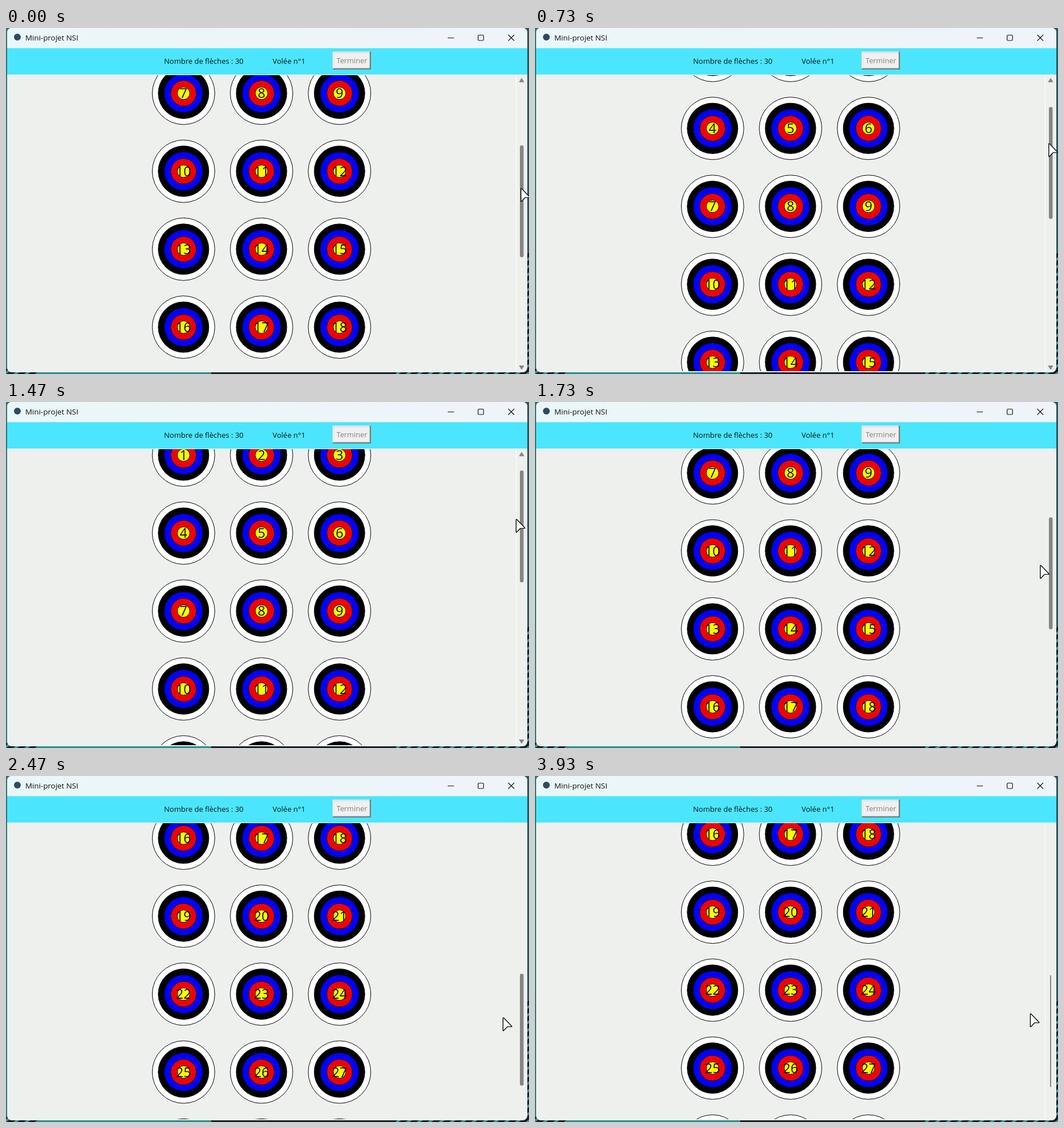
Recreate the animation shown at these times as an HTML page. Size 920 px wide and 609 px high, loop 4 s.

```html
<!DOCTYPE html>
<html lang="fr">
<head>
<meta charset="utf-8">
<title>Mini-projet NSI</title>
<style>
  html, body { margin: 0; width: 100%; height: 100%; overflow: hidden; background: #17242b; }
  svg { display: block; width: 920px; height: 609px; }
  text { font-family: "Open Sans", "Noto Sans", sans-serif; font-size: 13px; fill: #101314; }
  .num { font-size: 23.5px; text-anchor: middle; fill: #101010; }
  .rings circle { stroke: #000; stroke-width: 1; }
  .icons { fill: none; stroke: #111; stroke-width: 1.2; }
</style>
</head>
<body>
<svg viewBox="0 0 920 609">
  <defs>
    <pattern id="stripes" width="11" height="11" patternUnits="userSpaceOnUse" patternTransform="rotate(-35)">
      <rect width="11" height="11" fill="#17202a"/>
      <rect width="11" height="4" fill="#2d9a98"/>
    </pattern>
    <linearGradient id="bar">
      <stop offset="0" stop-color="#eaf7f8"/>
      <stop offset="1" stop-color="#eff4fa"/>
    </linearGradient>
    <clipPath id="win"><rect x="2" y="0" width="915" height="606" rx="8"/></clipPath>
    <clipPath id="view"><rect x="2" y="83" width="894" height="521"/></clipPath>
    <g id="target" class="rings">
      <circle r="55" fill="#fff"/>
      <circle r="44.5" fill="#000"/>
      <circle r="34" fill="#00f"/>
      <circle r="22.5" fill="#f00000"/>
      <circle r="11" fill="#ff0"/>
    </g>
  </defs>

  <rect width="920" height="609" fill="url(#stripes)"/>
  <rect width="10" height="600" fill="#2a7676"/>
  <rect x="910" width="10" height="395" fill="#275a60"/>
  <rect x="55" y="605" width="306" height="4" fill="#2a8f8c"/>
  <rect x="361" y="605" width="325" height="4" fill="#17242b"/>

  <g clip-path="url(#win)">
    <rect width="920" height="609" fill="#eef0ee"/>
    <rect width="920" height="36" fill="url(#bar)"/>
    <rect y="35.5" width="920" height="46.5" fill="#4be6fd"/>
    <rect y="82" width="920" height="1" fill="#f9fbfa"/>
    <rect id="edge" x="897" y="82" width="1" height="524" fill="#fff"/>
  </g>

  <circle cx="20" cy="16" r="6" fill="#2f4b63"/>
  <text x="34" y="22" style="font-size:13.4px">Mini-projet NSI</text>
  <g class="icons">
    <path d="M777 17.5h11M883.5 12l10.5 10.5M894 12l-10.5 10.5"/>
    <rect x="830.5" y="12.5" width="9.5" height="9.5" rx="1.5"/>
  </g>

  <g font-weight="500">
    <text x="278" y="63">Nombre de flèches : 30</text>
    <text x="469" y="63">Volée n°1</text>
  </g>
  <rect x="574.5" y="41.5" width="67.5" height="31.5" fill="#6b6f70"/>
  <path d="M574.5 41.5h66.5l-2 2H577v27l-2.5 1.500z" fill="#fff"/>
  <rect x="576.5" y="43.5" width="64" height="28" fill="#a3a6a6"/>
  <rect x="576.5" y="43.5" width="63" height="27" fill="#f0f0f0"/>
  <text x="581.5" y="62" style="font-size:12.8px;fill:#808080">Terminer</text>

  <g clip-path="url(#view)"><g id="list"></g></g>

  <path id="arrows" d="M907 88.5l4 6.5h-8zM907 601l4-6.5h-8z" fill="#858585" stroke="#858585" stroke-linejoin="round"/>
  <rect id="thumb" height="197" fill="#858585"/>
  <g id="cursor">
    <path d="M2 3V22.5L8.5 16H17z" fill="#000" opacity=".15"/>
    <path d="M.8 1V21.5Q.8 23 1.9 21.9L7.8 15.6H14.6Q16 15.4 15 14.3L2 .8Q.8 -.2 .8 1z" fill="#fff" stroke="#111" stroke-width="1.4" stroke-linejoin="round"/>
  </g>
</svg>
<script>
const LOOP = 4000, STEP = LOOP / 60, ROW = 137.2;
const $ = id => document.getElementById(id);
const edge = $('edge'), list = $('list'), arrows = $('arrows'), thumb = $('thumb'), cursor = $('cursor');

// [step, thumb top]
const THUMB = [[0, 206.4], [11, 139], [16, 101], [21, 101], [22, 120.6], [26, 203],
  [31, 287.4], [33, 313], [35, 334], [37, 348], [40, 350.5]];
// [step, tip x, tip y]
const POINTER = [[0, 905, 282], [11, 903, 203], [16, 901, 174], [19, 899, 181], [21, 899, 181],
  [22, 896.5, 206], [26, 888, 287], [31, 877, 368], [33, 875, 394], [35, 874, 415],
  [37, 873.5, 425], [47, 870.5, 418]];

function at(keys, n, col) {
  const i = keys.findIndex(k => k[0] > n);
  if (i < 0) return keys[keys.length - 1][col];
  const a = keys[i - 1], b = keys[i];
  return a[col] + (b[col] - a[col]) * (n - a[0]) / (b[0] - a[0]);
}

let html = '';
for (let i = 0; i < 30; i++) {
  const x = 312.3 + (i % 3) * ROW, y = Math.floor(i / 3) * ROW;
  html += `<g transform="translate(${x} ${y})"><use href="#target"/><text class="num" y="8.5">${i + 1}</text></g>`;
}
list.innerHTML = html;

function draw(ms) {
  const n = Math.floor(((ms + 4) % LOOP) / STEP);
  const top = at(THUMB, n, 1);
  const inside = n < 26, thin = n >= 47;
  const scroll = Math.floor(94 - (top - 120.5) * 2.947) + 0.5;
  list.setAttribute('transform', `translate(0 ${scroll})`);
  cursor.setAttribute('transform', `translate(${at(POINTER, n, 1)} ${at(POINTER, n, 2)}) scale(1.05)`);
  thumb.setAttribute('y', top);
  thumb.setAttribute('x', thin ? 906 : 904);
  thumb.setAttribute('width', thin ? 2 : 6.5);
  thumb.setAttribute('rx', thin ? 1 : 3);
  arrows.setAttribute('visibility', inside ? 'visible' : 'hidden');
  edge.setAttribute('visibility', inside || thin ? 'visible' : 'hidden');
}

const start = performance.now();
function tick() {
  draw(performance.now() - start);
  requestAnimationFrame(tick);
}
draw(0);
requestAnimationFrame(tick);
</script>
</body>
</html>
```
